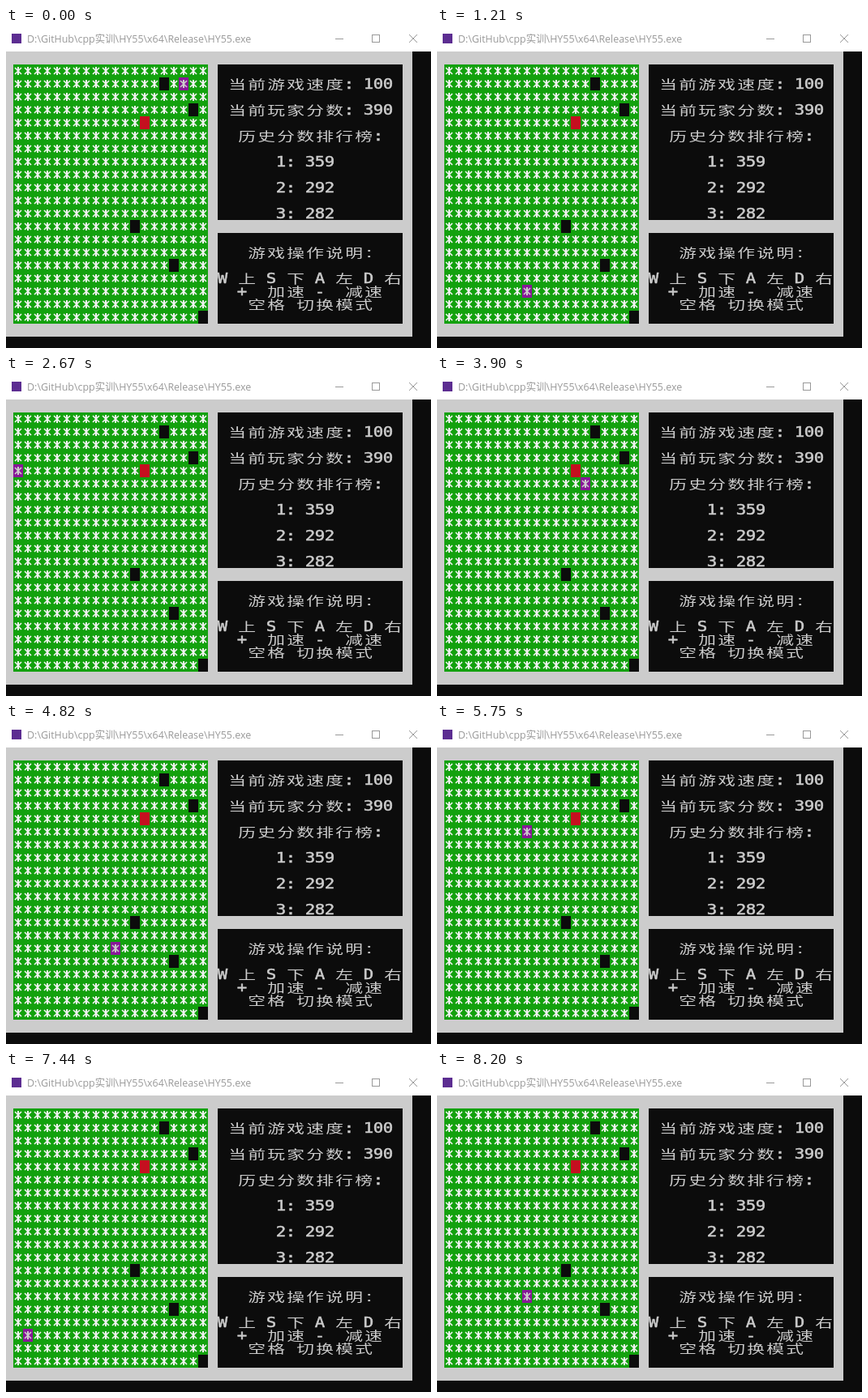
Write an HTML page with a canvas that moves like this. It is 524 by 395 pixels and loops after 8280 ms.

```html
<!DOCTYPE html>
<html lang="zh-CN">
<head>
<meta charset="utf-8">
<title>Console</title>
<style>
html, body { margin: 0; width: 100%; height: 100%; overflow: hidden; background: #0c0c0c; }
canvas { display: block; }
</style>
</head>
<body>
<canvas id="stage" width="524" height="395"></canvas>
<script>
const ctx = document.getElementById('stage').getContext('2d');
const LOOP = 8280, STEP = 76.8, LAST = 107;
const W = 12, H = 16, LEFT = 9, TOP = 45, SIZE = 20, PANEL = 261, PANEL_COLS = 19;
const GREEN = '#13a10e', BLACK = '#0c0c0c', RED = '#c50f1f', PURPLE = '#881798';
const GRAY = '#cccccc', WHITE = '#f2f2f2', TITLE = '#999999';

const holes = [[15, 1], [18, 3], [12, 12], [16, 15], [19, 19]];

// Key points of the random walk: [step, column, row]
const route = [
  [0, 17, 1], [10, 9, 19], [16, 8, 17], [20, 0, 16], [27, 7, 10], [35, 0, 4],
  [46, 16, 0], [51, 14, 5], [57, 17, 5], [63, 10, 14], [71, 4, 6], [80, 12, 0],
  [88, 19, 15], [97, 1, 17], [107, 8, 14]
];

const scores = ['当前游戏速度: 100', '当前玩家分数: 390', '历史分数排行榜:',
  '1: 359', '2: 292', '3: 282'];
const help = [' 游戏操作说明：', '', 'W 上 S 下 A 左 D 右', '+  加速 -  减速', '空格 切换模式'];

function rect(color, x, y, w, h) {
  ctx.fillStyle = color;
  ctx.fillRect(x, y, w, h);
}

function stroke(color, width, ...segments) {
  ctx.strokeStyle = color;
  ctx.lineWidth = width;
  ctx.beginPath();
  for (const [x1, y1, x2, y2] of segments) {
    ctx.moveTo(x1, y1);
    ctx.lineTo(x2, y2);
  }
  ctx.stroke();
}

function cell(color, col, row, star) {
  const x = LEFT + col * W, y = TOP + row * H;
  rect(color, x, y, W, H);
  if (!star) return;
  rect(star, x + 5, y + 3, 2, 10);
  stroke(star, 1.7, [x + 2, y + 4, x + 10, y + 12], [x + 10, y + 4, x + 2, y + 12]);
}

// Console grid: wide characters take two cells
const cells = ch => ch > '\u2e80' ? 2 : 1;

function centered(text, row) {
  const chars = [...text];
  const free = PANEL_COLS - chars.reduce((sum, ch) => sum + cells(ch), 0);
  let x = PANEL + Math.floor(free / 2) * W;
  ctx.fillStyle = ctx.strokeStyle = GRAY;
  ctx.lineWidth = 0.5;
  ctx.textAlign = 'center';
  for (const ch of chars) {
    const wide = cells(ch) === 2, w = cells(ch) * W;
    ctx.save();
    ctx.translate(x + w / 2, TOP + row * H + (wide ? 13.5 : 14));
    ctx.scale(wide ? 1.5 : 1.15, 1);
    ctx.font = wide ? '14.5px "Noto Sans CJK SC", "Noto Sans CJK", sans-serif'
                    : '18px "DejaVu Sans Mono", monospace';
    ctx.fillText(ch, 0, 0);
    if (!wide) ctx.strokeText(ch, 0, 0);
    ctx.restore();
    x += w;
  }
}

function titleBar() {
  rect('#ffffff', 0, 0, 524, 29);
  rect('#5c2d91', 7, 7, 12, 12);
  ctx.fillStyle = TITLE;
  ctx.textAlign = 'left';
  ctx.font = '12.45px "Open Sans", "Noto Sans CJK SC", sans-serif';
  ctx.fillText('D:\\GitHub\\cpp实训\\HY55\\x64\\Release\\HY55.exe', 26, 18);
  stroke(TITLE, 1, [406, 13.5, 416, 13.5], [497, 8, 507, 18], [507, 8, 497, 18]);
  ctx.strokeRect(451.5, 8.5, 9, 9);
}

const stepAt = t => Math.min(LAST, Math.floor(12 + (t - 900) / STEP));

function noise(k) {
  const v = Math.sin(k * 78.233 + 3) * 43758.5453;
  return v - Math.floor(v) - 0.5;
}

// Straight runs between key points, with a seeded wobble that fades out at each one
function cursorAt(n) {
  const i = Math.max(1, route.findIndex(p => p[0] >= n));
  const a = route[i - 1], b = route[i];
  const f = (n - a[0]) / (b[0] - a[0]);
  const wobble = 3 * Math.sin(Math.PI * f);
  return [1, 2].map(k => {
    const v = a[k] + (b[k] - a[k]) * f + wobble * noise(n * 2 + k);
    return Math.max(0, Math.min(SIZE - 1, Math.round(v)));
  });
}

function draw(n) {
  rect(BLACK, 0, 0, 524, 395);
  titleBar();
  rect(GRAY, 0, 29, 501, 352);
  rect(BLACK, PANEL, TOP, PANEL_COLS * W, 12 * H);
  rect(BLACK, PANEL, TOP + 13 * H, PANEL_COLS * W, 7 * H);
  for (let i = 0; i < SIZE * SIZE; i++) cell(GREEN, i % SIZE, Math.floor(i / SIZE), WHITE);
  for (const [col, row] of holes) cell(BLACK, col, row);
  cell(RED, 13, 4);
  cell(PURPLE, ...cursorAt(n), GRAY);
  scores.forEach((text, i) => centered(text, 2 * i + 1));
  help.forEach((text, i) => centered(text, i + 14));
}

let shown = -1;
const start = performance.now();
function tick() {
  const n = stepAt((performance.now() - start) % LOOP);
  if (n !== shown) draw(shown = n);
  requestAnimationFrame(tick);
}
tick();
</script>
</body>
</html>
```
